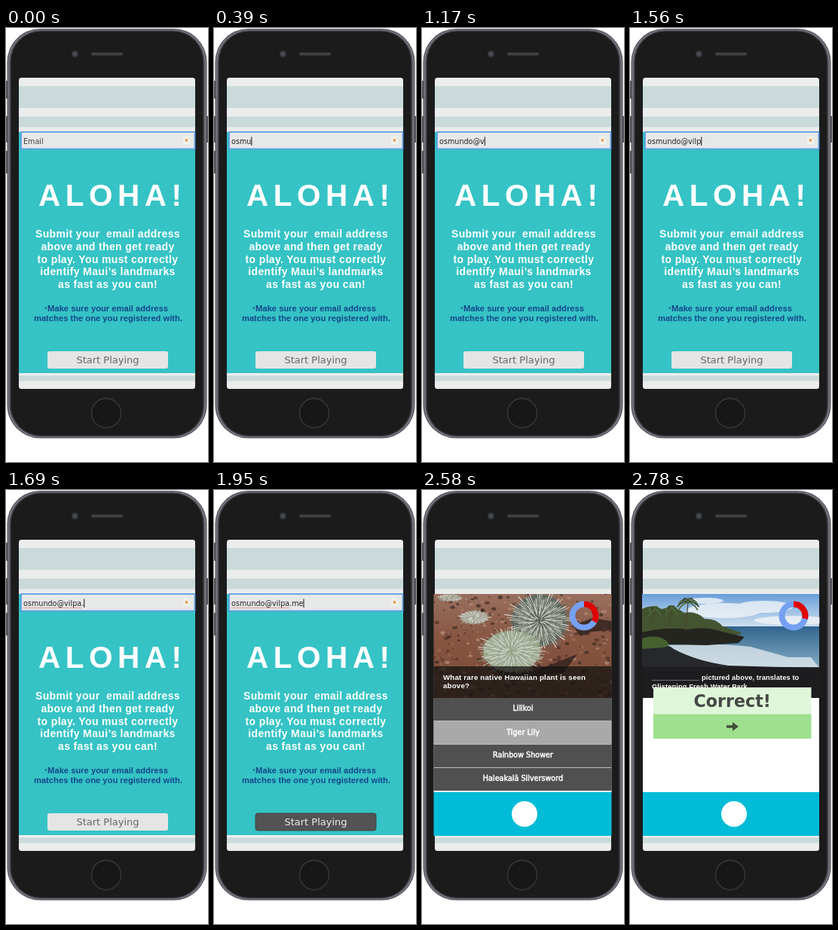
An HTML page for the animation above (3.78 s loop, 268 by 576 pixels).

```html
<!DOCTYPE html>
<html lang="en">
<head>
<meta charset="utf-8">
<title>Phone quiz</title>
<style>
  html, body { margin: 0; width: 100%; height: 100%; overflow: hidden; background: #fff; }
  svg { display: block; width: 268px; height: 576px; }
  .sans { font-family: "Liberation Sans", Arial, sans-serif; font-weight: 700; }
  .ui { font-family: "DejaVu Sans", Verdana, sans-serif; }
  .mid { text-anchor: middle; }
  .title { font-size: 40.5px; letter-spacing: 6.5px; fill: #fff; }
  .intro { font-size: 14px; letter-spacing: .35px; fill: #fff; }
  .note { font-size: 11.2px; fill: #14468a; }
  .field { font-size: 9.65px; fill: #222; }
  .answer { font-size: 9.65px; fill: #fff; stroke: #fff; stroke-width: .5px; }
  .question { font-size: 9.7px; letter-spacing: .2px; fill: #fff; }
  .caption { font-size: 9.3px; letter-spacing: .1px; fill: #fff; }
</style>
</head>
<body>
<svg viewBox="0 0 268 576" xmlns="http://www.w3.org/2000/svg">
  <defs>
    <linearGradient id="soil" x2="0" y2="1">
      <stop offset="0" stop-color="#98705f"/><stop offset=".4" stop-color="#885743"/>
      <stop offset="1" stop-color="#794936"/>
    </linearGradient>
    <linearGradient id="sky" x2="0" y2="1">
      <stop offset="0" stop-color="#6a9fda"/><stop offset="1" stop-color="#d9e6f1"/>
    </linearGradient>
    <linearGradient id="sea" x2="0" y2="1">
      <stop offset="0" stop-color="#31658f"/><stop offset="1" stop-color="#86aec2"/>
    </linearGradient>
    <clipPath id="photoClip"><rect x="15.500" y="138" width="236" height="138"/></clipPath>
    <clipPath id="screenClip"><rect x="17" y="66" width="234" height="413" rx="3.500"/></clipPath>
  </defs>

  <g id="phone">
    <path d="M0 70h3v24h-3zM0 117h3v35h-3zM0 163h3v30h-3zM265 117h3v35h-3z" fill="#5b5c62"/>
    <rect x="1.500" y="1" width="265" height="543.500" rx="44" fill="#4d4e55"/>
    <rect x="2.700" y="2" width="262.600" height="541.500" rx="43" fill="#7b7c85"/>
    <rect x="4.500" y="3" width="259" height="539.500" rx="42" fill="#494a51"/>
    <rect x="6.500" y="4.500" width="255" height="536.500" rx="40" fill="#1b1b1c"/>
    <circle cx="91.500" cy="34.500" r="4.500" fill="#37383c"/>
    <circle cx="91.500" cy="34.500" r="2" fill="#4c5363"/>
    <rect x="113" y="32.500" width="42" height="4" rx="2" fill="#404041"/>
    <circle cx="133" cy="511" r="19.500" fill="#171718" stroke="#3a3a3b" stroke-width="1.300"/>
  </g>

  <g clip-path="url(#screenClip)">
    <rect x="17" y="66" width="234" height="413" fill="#ebecec"/>
    <path d="M17 77h234v29h-234zM17 117.500h234v14h-234zM17 461.500h234v7h-234z" fill="#cadadb"/>
  </g>

  <g id="form">
    <rect x="17" y="138" width="234" height="320" fill="#35c3c5"/>
    <rect x="20" y="138" width="230.500" height="22.500" fill="#e7e8e8" stroke="#5f9fe6" stroke-width="1.800"/>
    <rect x="235" y="144" width="9" height="10" fill="#f2f0ea"/>
    <circle cx="239.500" cy="149" r="1.900" fill="#dda251"/>
    <text id="email" class="ui field" x="23" y="153.500"></text>
    <path id="spelling" stroke="#d84a3c" stroke-width="1.200" stroke-dasharray="1 1" fill="none"/>
    <path id="caret" stroke="#111" stroke-width="1"/>
    <text class="sans title" x="43" y="236">ALOHA!</text>
    <g id="intro" class="sans intro mid"></g>
    <g class="sans note mid">
      <text x="52.500" y="375" font-size="7">*</text>
      <text x="135" y="376">Make sure your email address</text>
      <text x="135.500" y="389">matches the one you registered with.</text>
    </g>
    <rect id="button" x="55" y="429" width="160" height="23" rx="3"/>
    <text id="buttonText" class="ui mid" x="135" y="445" font-size="13">Start Playing</text>
  </g>

  <g id="quiz">
    <g clip-path="url(#photoClip)">
      <rect x="15" y="138" width="237" height="138" fill="url(#soil)"/>
      <g id="rocks"></g>
      <path d="M70 222q45 35 100 10l36-14-18 24-70 12zM200 180l26-10 26 4v12l-26 2-16 6z" fill="#2e211d" opacity=".8"/>
      <g id="plants" fill="none"></g>
      <rect x="15" y="234" width="237" height="42" fill="#141312" opacity=".74"/>
    </g>
    <g class="sans question">
      <text x="28" y="251.500">What rare native Hawaiian plant is seen</text>
      <text x="28" y="263">above?</text>
    </g>
    <rect x="15.500" y="276" width="236" height="123" fill="#bdbdbd"/>
    <rect x="15.500" y="398.500" width="236" height="3" fill="#f4f4f4"/>
    <g id="answers"></g>
  </g>

  <g id="result">
    <g clip-path="url(#photoClip)">
      <rect x="16" y="138" width="235" height="48" fill="url(#sky)"/>
      <g fill="#f1f4f7" opacity=".8">
        <ellipse cx="125" cy="160" rx="50" ry="10"/><ellipse cx="178" cy="155" rx="38" ry="8"/>
        <ellipse cx="215" cy="173" rx="50" ry="6"/><ellipse cx="100" cy="147" rx="24" ry="4"/>
      </g>
      <rect x="16" y="181" width="235" height="56" fill="url(#sea)"/>
      <path d="M50 206q60-4 110 2l50 14h30l11 14H50z" fill="#e4ebef" opacity=".75"/>
      <path d="M16 158q12-7 26 0 16-5 30 5 16-3 27 8 15-1 24 10l26 9-20 8H16z" fill="#445431"/>
      <path d="M16 189q30-8 62-4 24-4 44 3l30 7-8 8-42 3-50-1-36 4z" fill="#24251f"/>
      <path d="M16 205q30-4 42 6 30 16 72 22 60 2 121 3v40H16z" fill="#26282c"/>
      <path d="M16 197q20-6 32 3 8 7-4 9l-28 2z" fill="#46602f"/>
      <g id="palms" fill="none" stroke-linecap="round"></g>
      <rect x="16" y="235" width="235" height="41" fill="#1b1b1d" opacity=".8"/>
    </g>
    <g class="sans caption">
      <text x="29" y="251.500">____________ pictured above, translates to</text>
      <text x="29" y="264">Glistening Fresh Water Park</text>
    </g>
    <rect x="17" y="276" width="234" height="126" fill="#fff"/>
    <rect x="31" y="262" width="209.500" height="36" fill="#dff7d9"/>
    <rect x="31" y="297.500" width="209.500" height="32.500" fill="#9fe08e"/>
    <text class="ui mid" x="135.700" y="288" font-size="22.200" font-weight="700" fill="#454845">Correct!</text>
    <path d="M128 312.300h8v-4.300l8 6-8 6v-4.300h-8z" fill="#40513a"/>
  </g>

  <g id="shared">
    <rect id="footer" y="401" height="58" fill="#00bcd7"/>
    <circle id="badge" cy="430" r="17" fill="#fff"/>
    <g id="dial" fill="none" stroke-width="8">
      <circle r="15.500" stroke="#76a0f2"/>
      <path id="elapsed" stroke="#df0000"/>
    </g>
  </g>
</svg>

<script>
const LOOP = 3780, STEP = 130;
const ADDRESS = "osmundo@vilpa.me";
const $ = id => document.getElementById(id);

function add(parent, tag, attrs, text) {
  const el = document.createElementNS("http://www.w3.org/2000/svg", tag);
  for (const key in attrs) el.setAttribute(key, attrs[key]);
  if (text) el.textContent = text;
  $(parent).append(el);
  return el;
}

let seed = 17;
function random(min, max) {
  seed = (seed * 16807) % 2147483647;
  return min + (max - min) * seed / 2147483647;
}

["Submit your\u00a0 email address", "above and then get ready", "to play. You must correctly",
 "identify Maui’s landmarks", "as fast as you can!"]
  .forEach((line, i) => add("intro", "text", { x: 135, y: 278 + i * 16.8 }, line));

const rows = [["Lilikoi", 276, 292.5], ["Tiger Lily", 307, 324.5],
  ["Rainbow Shower", 338, 354.7], ["Haleakalā Silversword", 369, 386]].map(([label, top, baseline]) => {
  const row = add("answers", "rect", { x: 15.5, y: top, width: 236, height: 30, fill: "#505050" });
  add("answers", "text", { x: 134, y: baseline, class: "ui answer mid" }, label);
  return row;
});

for (let i = 0; i < 420; i++) {
  const size = random(.6, 2.4);
  add("rocks", "ellipse", { cx: random(15, 252), cy: random(138, 276), rx: size * 1.4, ry: size,
    fill: ["#503126", "#b58d78", "#3b2822", "#a1684f"][i % 4], opacity: .7 });
}

// Leaves radiate from a core, longest first, so the short ones lie on top.
function plant(cx, cy, rx, ry, count, core) {
  add("plants", "ellipse", { cx, cy, rx: rx * .8, ry: ry * .8, fill: core });
  for (let i = 0; i < count; i++) {
    const angle = i * 2.4, reach = Math.sqrt((count - i) / count) * random(.9, 1.05);
    const dx = Math.cos(angle) * rx * reach, dy = Math.sin(angle) * ry * reach;
    add("plants", "path", { d: `M${cx + dx * .4} ${cy + dy * .4}L${cx + dx} ${cy + dy}`,
      stroke: ["#dcdfd8", core, "#b3bcae", core][i % 4], "stroke-width": 1.1 });
  }
}
plant(37, 143, 17, 6, 50, "#a29b8c");
plant(69, 169, 22, 11, 70, "#a7a495");
plant(156, 173, 46, 43, 240, "#62685f");
plant(119, 214, 47, 34, 240, "#98a488");

function palm(x, base, top, spread) {
  add("palms", "path", { d: `M${x - 4} ${base}Q${x - 1} ${(base + top) / 2} ${x} ${top}`,
    stroke: "#4a4434", "stroke-width": 1.3 });
  for (let i = 0; i < 9; i++) {
    const angle = Math.PI * (.85 + i * .1625);
    const dx = Math.cos(angle) * spread, dy = Math.sin(angle) * spread * .6;
    add("palms", "path", { d: `M${x} ${top}q${dx * .6} ${dy - 2} ${dx} ${dy + 6}`,
      stroke: i % 2 ? "#34472a" : "#52693a", "stroke-width": 1.8 });
  }
}
palm(33, 178, 158, 9);
palm(55, 180, 157, 9);
palm(77, 186, 149, 14);

const show = (el, on) => el.setAttribute("display", on ? "inline" : "none");

function drawForm(step) {
  const count = step && Math.min(step + (step < 8 || step > 12), ADDRESS.length);
  const ready = step >= 15;
  const email = $("email");
  email.textContent = count ? ADDRESS.slice(0, count) : "Email";
  email.setAttribute("fill-opacity", count ? 1 : .85);

  const end = 23.5 + email.getComputedTextLength();
  $("caret").setAttribute("d", `M${end} 144.500V156`);
  show($("caret"), count && step !== 7);

  const dot = ADDRESS.indexOf(".");
  show($("spelling"), count > dot);
  if (count > dot) $("spelling").setAttribute("d", `M23 156.500H${23 + email.getSubStringLength(0, dot)}`);

  $("button").setAttribute("fill", ready ? "#535353" : "#e5e5e5");
  $("button").setAttribute("stroke", ready ? "#3d4a4a" : "none");
  $("buttonText").setAttribute("fill", ready ? "#eee" : "#666");
}

function drawShared(finished) {
  const angle = (finished ? 104 : 120) * Math.PI / 180;
  const left = finished ? 17 : 15.5, right = finished ? 251 : 251.5;
  $("footer").setAttribute("x", left);
  $("footer").setAttribute("width", right - left);
  $("dial").setAttribute("transform", `translate(${finished ? 217 : 215} 167)`);
  $("elapsed").setAttribute("d",
    `M0 -15.500A15.500 15.500 0 0 1 ${15.5 * Math.sin(angle)} ${-15.5 * Math.cos(angle)}`);
  $("badge").setAttribute("cx", finished ? 138 : 136);
}

function update(time) {
  const t = time % LOOP;
  const typing = t < 2080, finished = t >= 2780;
  show($("form"), typing);
  show($("quiz"), !typing && !finished);
  show($("result"), finished);
  show($("shared"), !typing);
  if (typing) drawForm(Math.floor(t / STEP));
  else drawShared(finished);
  rows[1].setAttribute("fill", t >= 2580 ? "#a9a9aa" : "#505050");
}

const start = performance.now();
function tick() {
  update(performance.now() - start);
  requestAnimationFrame(tick);
}
tick();
</script>
</body>
</html>
```
